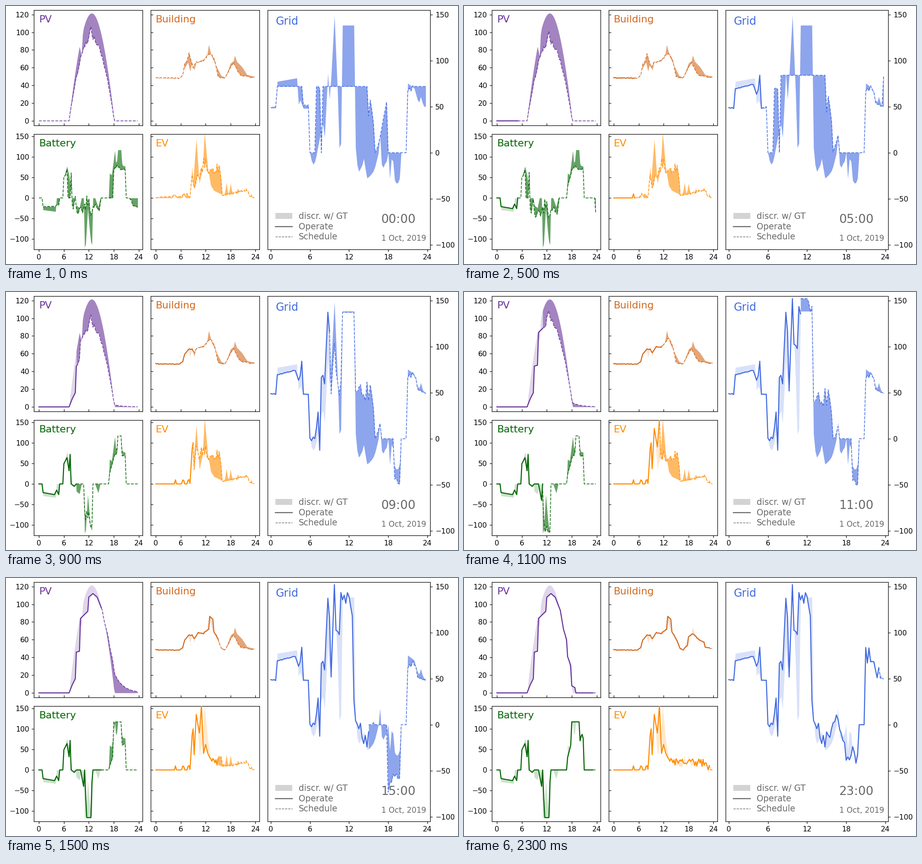
Animation of 990x566 px, one loop 2.4 s. Source, as a matplotlib script:

```python
import numpy as np
import matplotlib.pyplot as plt
from matplotlib.animation import FuncAnimation
from matplotlib.lines import Line2D
from matplotlib.patches import Rectangle

W, H, DPI = 990, 566, 100
PX = 72 / DPI
T = np.arange(96) / 4
LIMIT = 117  # battery power
NAMES = ["PV", "Building", "Battery", "EV", "Grid"]

plt.rcParams["font.family"] = "DejaVu Sans"
rng = np.random.default_rng(4)


def path(*pts):
    return np.interp(T, *zip(*pts))


def bump(t, height, width):
    return height * np.maximum(0, 1 - abs(T - t) / width)


def during(a, b):
    return (T >= a) & (T < b)


def noise(amp):
    return amp * rng.uniform(-1, 1, len(T))


def balance(pv, building, battery, ev):
    """All five series; the grid covers whatever the others leave open."""
    return dict(zip(NAMES, (pv, building, battery, ev, building + ev - pv - battery)))


sun = np.sin(np.pi * np.clip((T - 7.25) / 10.85, 0, 1)) ** .9
night = path((0, 48.5), (5.5, 48), (6.5, 51))


# Ground truth: the optimum known in hindsight
def make_truth():
    pv = 121.5 * sun - bump(10.25, 22, .5) + bump(10.5, 8, .25)
    building = np.where(T < 6.5, night, path(
        (6.5, 52), (6.75, 58), (7.75, 66), (8.25, 56), (8.75, 66), (9.25, 57), (9.75, 66), (12.25, 71),
        (12.75, 86), (13.5, 72), (15, 58), (15.75, 51), (16.75, 49), (18, 65), (18.75, 68), (19, 74),
        (19.5, 67), (20.75, 61), (22, 52), (23.75, 50)))
    ev = path((8.25, 0), (8.75, 76), (9, 42), (9.75, 143), (10.5, 35), (11.25, 70), (11.75, 160),
              (12.5, 75), (13.25, 30), (14, 18), (16, 8), (19, 13), (22, 18), (22.75, 0))
    ev += bump(4.5, 9, .5) + bump(6.75, 9, .4) + bump(17, 28, .4) + bump(18, 24, .4) + bump(19.75, 9, .4) + bump(23, 10, .4)
    battery = path((.75, 0), (1, -29), (4, -33), (4.25, 0), (5.75, 0), (6, 50), (6.75, 77), (7.25, 55), (8, 0),
                   (8.75, 0), (9, -18), (9.75, -24), (10.25, 0), (13.5, 0), (14.25, -22), (14.75, 0), (16.75, 0),
                   (17, 60), (17.5, 56), (18.25, 115), (18.5, 86), (18.75, 90), (19, LIMIT), (19.75, LIMIT))
    net = building + ev - pv
    battery = np.where(during(11, 12.9), net - 138.5, battery)
    battery = np.where(T >= 20, np.where(T < 21, net, 0), battery)
    return balance(pv, building, battery, ev)


# What was actually operated
def make_real():
    pv = path((7.25, 0), (8, 9), (8.75, 16), (9, 46), (9.75, 47), (10, 84), (11.75, 92), (12, 108), (13, 112),
              (14, 108), (15.25, 93), (16, 72), (16.75, 60), (17, 41), (17.75, 31), (18, 8), (18.75, 6), (19, 0))
    building = np.where(T < 6.5, night, path(
        (6.5, 51), (7, 60), (8, 65), (8.75, 65), (9.25, 61), (10.25, 68), (11.5, 67), (12.75, 72), (13, 86),
        (13.75, 83), (14, 69), (15, 61), (16, 50), (16.75, 48.5), (17.75, 54), (18, 63), (19, 67), (20.5, 60),
        (21.75, 57), (22, 52), (23.75, 50))) + noise(.5)
    ev = path((8.25, 0), (8.75, 85), (9, 100), (9.25, 37), (9.75, 135), (10.5, 90), (11, 157), (11.5, 40),
              (12, 62), (12.5, 41), (13, 30), (13.75, 20), (22.25, 17), (22.75, 0))
    ev += bump(4.75, 10, .25) + bump(6.6, 13, .4) + bump(7.9, 14, .4) + bump(23, 11, .25)
    ev += noise(9) * during(13.5, 22)
    battery = path((.75, 0), (1, -21), (3.75, -26), (4.25, -15), (4.75, -26), (5, 0), (5.75, 0), (6, 49), (6.75, 64),
                   (7.25, 32), (7.5, 72), (7.75, 0), (8.5, -6), (9, 0), (10, 0), (10.75, -40), (11, 0), (11.25, -65),
                   (11.5, -116), (12.5, -116), (12.75, -30), (13, 0), (16.75, 0), (17, 30), (17.75, 60), (18, LIMIT))
    battery = np.where(T >= 20, np.where(T < 21, building + ev - pv, 0), battery)
    return balance(pv, building, battery, ev)


truth, real = make_truth(), make_real()

# First forecasts
b_guess = np.where(T < 6.5, night, path(
    (6.5, 52), (7, 65), (7.5, 67), (8, 76), (8.5, 67), (9, 60), (9.75, 66), (11.5, 68), (12.75, 76), (13.5, 75),
    (14.25, 67), (15, 50), (16.5, 48), (17.5, 56), (18.75, 66), (19.75, 55), (20.5, 51), (23.75, 49))) + noise(.8)
e_guess = path((8.25, 3), (8.75, 55), (9.25, 22), (9.75, 46), (11, 63), (11.75, 92), (12.25, 68), (15.5, 75),
               (16, 6), (18, 9), (21, 18), (22.25, 20), (22.5, 5), (23.75, 0))
e_guess = e_guess * (1 + noise(.2)) + bump(4.5, 6, .5) + bump(6.75, 9, .4) + bump(7.5, 8, .4)
sun_noise = noise(.03)


def make_plan(hour):
    """Forecast pulled towards reality near the present, then battery dispatch."""
    near = np.exp(-np.maximum(T - hour, 0) / 1.2)

    def update_guess(guess, name):
        return guess + (real[name] - guess) * near

    level = np.interp(hour, (0, 7, 11, 15), (.77, .71, .78, .93))
    tail = np.interp(hour, (7, 11, 15, 19), (0, 5, 25, 0)) * np.exp(-abs(T - 18) / 2)
    pv = update_guess(121.5 * sun * (level + sun_noise) + bump(12.5, 12, .5) + tail, "PV")
    building = update_guess(b_guess, "Building")
    ev = update_guess(e_guess, "EV")
    net = building + ev - pv

    cap = max(72, real["Grid"][:4 * hour + 1].max())
    charge = during(1, 4.9) | during(22 + hour / 3, 24)
    charge |= during(8, 14.9) if hour < 9 else during(11, 12.9)
    follow = during(6, 6.9) | during(7.7, 7.8) | during(18 if hour < 5 else 17, 21)
    full = during(18 if hour > 12 else 19, 20) & (hour > 8)

    battery = np.select([full, charge, follow], [LIMIT, net - cap, net], 0)
    plan = balance(pv, building, np.clip(battery, -LIMIT, LIMIT), ev)
    plan["Grid"] = np.where(full, plan["Grid"], np.maximum(plan["Grid"], 0))
    return plan


fig = plt.figure(figsize=(W / DPI, H / DPI), dpi=DPI, facecolor="white")


def label(x, y, s, size, color="dimgray"):
    return fig.text(x / W, 1 - y / H, s, fontsize=size * PX, color=color)


class Panel:
    def __init__(self, name, color, box, xlim, ylim, yticks, pos, size=21.9):
        x0, y0, x1, y1 = box
        self.ax = ax = fig.add_axes([x0 / W, 1 - y1 / H, (x1 - x0) / W, (y1 - y0) / H])
        ax.set(xlim=xlim, ylim=ylim, xticks=range(0, 25, 6), yticks=yticks)
        ax.tick_params(labelsize=15.6 * PX, length=5.3 * PX, pad=5.3 * PX, width=1.2 * PX)
        for spine in ax.spines.values():
            spine.set_linewidth(1.2 * PX)
        label(*pos, name, size, color)
        self.name, self.color = name, color
        self.done, = ax.plot([], [], color=color, lw=2.3 * PX, zorder=3)
        self.todo, = ax.plot([], [], "--", color=color, lw=1.7 * PX, alpha=.85, zorder=3)
        self.fills = []

    def show(self, hour, plan):
        past, ahead = slice(0, 4 * hour + 1), slice(4 * hour, None)
        done, todo, best = real[self.name], plan[self.name], truth[self.name]
        self.done.set_data(T[past], done[past])
        self.todo.set_data(T[ahead], todo[ahead])
        for f in self.fills:
            f.remove()
        self.fills = [self.ax.fill_between(T[s], v[s], best[s], color=self.color, alpha=a, lw=0)
                      for s, v, a in ((past, done, .2), (ahead, todo, .6))]


small, power, energy = (-1.1875, 24.9375), (-5, 125), (-125, 155)
p_ticks, e_ticks = range(0, 121, 20), range(-100, 151, 50)
left, mid, top, low = (61.3, 299.2), (317.2, 554.9), (8.9, 261.8), (281.3, 533.8)


def box(cols, rows):
    return cols[0], rows[0], cols[1], rows[1]


panels = [
    Panel("PV", "rebeccapurple", box(left, top), small, power, p_ticks, (72.8, 35.5)),
    Panel("Building", "chocolate", box(mid, top), small, power, p_ticks, (328.3, 35.5)),
    Panel("Battery", "darkgreen", box(left, low), small, energy, e_ticks, (72.8, 307.5)),
    Panel("EV", "darkorange", box(mid, low), small, energy, e_ticks, (328, 307.5)),
    Panel("Grid", "royalblue", (573.3, 8.9, 929.3, 533.8), (-.47, 24.46), (-105, 155), e_ticks, (591, 41), 23.8),
]
for p in panels[:2]:
    p.ax.tick_params(axis="x", labelbottom=False, direction="in")
for p in panels[1:4:2]:
    p.ax.tick_params(axis="y", labelleft=False, direction="in")
panels[4].ax.yaxis.tick_right()

# Legend
fig.add_artist(Rectangle((590 / W, 1 - 467 / H), 37 / W, 13 / H, color="lightgray", lw=0))
for y, style, lw in ((483.5, "-", 2.3), (506, "--", 1.3)):
    fig.add_artist(Line2D([590 / W, 627 / W], [1 - y / H] * 2, ls=style, lw=lw * PX, color="dimgray"))
for y, s in ((467, "discr. w/ GT"), (490, "Operate"), (512.5, "Schedule")):
    label(641, y, s, 18.6)
clock = label(821.5, 475.5, "00:00", 26.2)
label(821.5, 515, "1 Oct, 2019", 16.8)


def update(hour):
    plan = make_plan(hour)
    for p in panels:
        p.show(hour, plan)
    clock.set_text(f"{hour:02d}:00")
    return []


anim = FuncAnimation(fig, update, frames=24, interval=100, repeat=True, repeat_delay=0, blit=False)
plt.show()
```
